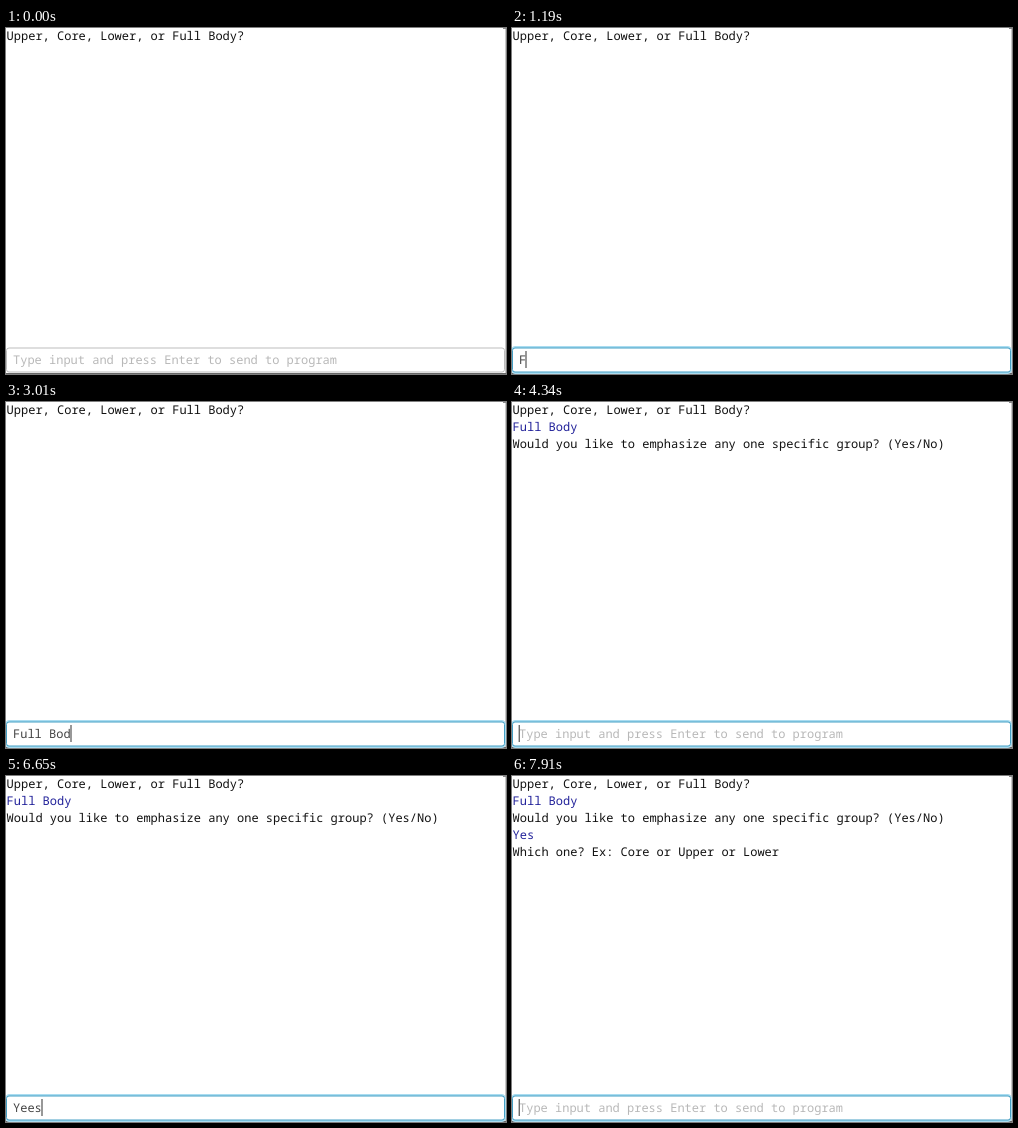
An HTML page for the animation above (8000 ms loop, 500 by 346 pixels).

```html
<!DOCTYPE html>
<html lang="en">
<head>
<meta charset="utf-8">
<title>Console</title>
<style>
  html, body { margin: 0; width: 100%; height: 100%; overflow: hidden; background: #fff; }
  svg { display: block; }
  text {
    font: 12px "Roboto Mono", "Noto Sans Mono", "DejaVu Sans Mono", monospace;
    white-space: pre;
    text-rendering: geometricPrecision;
  }
  .prompt { fill: #111; }
  .answer { fill: #22229a; }
</style>
</head>
<body>
<svg width="500" height="346" viewBox="0 0 500 346">
  <path d="M499.5 0V346" stroke="#c9c9c9"/>
  <path d="M0 345.5H500" stroke="#666"/>
  <path d="M497 0.5H500" stroke="#888"/>
  <g id="log"></g>
  <rect id="glow" x="0.5" y="319.5" width="498" height="25" rx="3" fill="none" stroke="#a9dcf0" stroke-width="3"/>
  <rect id="box" x="0.5" y="320" width="498" height="24" rx="2.5" fill="#fff"/>
  <text id="field" x="7" y="336"></text>
  <rect id="caret" y="323" width="1" height="17" fill="#333"/>
</svg>
<script>
const LOOP = 8000, CHAR = 7.2, LINE = 17;
const HINT = "Type input and press Enter to send to program";
const [log, glow, box, field, caret] =
  ["log", "glow", "box", "field", "caret"].map(id => document.getElementById(id));

// [time, text in the field]
const typing = [
  [0, ""], [1190, "F"], [1610, "Fu"], [1890, "Ful"], [2030, "Full"], [2520, "Full "],
  [2730, "Full B"], [2870, "Full Bo"], [3010, "Full Bod"], [3850, "Full Body"], [4340, ""],
  [5950, "Y"], [6370, "Ye"], [6440, "Yee"], [6650, "Yees"], [7140, "Yee"],
  [7280, "Ye"], [7350, "Yes"], [7910, ""]
];
// [time, caret visible]
const blinks = [
  [0, false], [490, true], [980, false], [1190, true], [3570, false], [3850, true],
  [4830, false], [5320, true], [5880, false], [5950, true]
];
// [time, style, text]
const lines = [
  [0, "prompt", "Upper, Core, Lower, or Full Body?"],
  [4340, "answer", "Full Body"],
  [4340, "prompt", "Would you like to emphasize any one specific group? (Yes/No)"],
  [7910, "answer", "Yes"],
  [7910, "prompt", "Which one? Ex: Core or Upper or Lower"]
].map(([time, style, content], i) => {
  const node = document.createElementNS("http://www.w3.org/2000/svg", "text");
  node.setAttribute("class", style);
  node.setAttribute("x", 0.6);
  node.setAttribute("y", 12 + i * LINE);
  node.textContent = content;
  log.append(node);
  return { time, node };
});

const show = (node, on) => node.setAttribute("visibility", on ? "visible" : "hidden");
const latest = (steps, t) => steps.findLast(([time]) => time <= t)[1];

function draw(t) {
  const typed = latest(typing, t);
  const focused = t >= 420;
  for (const { time, node } of lines) show(node, t >= time);
  show(glow, focused);
  glow.setAttribute("opacity", t < 490 ? 0.7 : 1);
  box.setAttribute("stroke", focused ? "#459fc4" : "#bdbdbd");
  field.textContent = typed || HINT;
  field.setAttribute("fill", typed ? "#444" : "#b8b8b8");
  caret.setAttribute("x", Math.round(7 + typed.length * CHAR) - (typed ? 0.5 : 0.3));
  show(caret, latest(blinks, t));
}

function tick() {
  draw(performance.now() % LOOP);
  requestAnimationFrame(tick);
}
tick();
</script>
</body>
</html>
```
